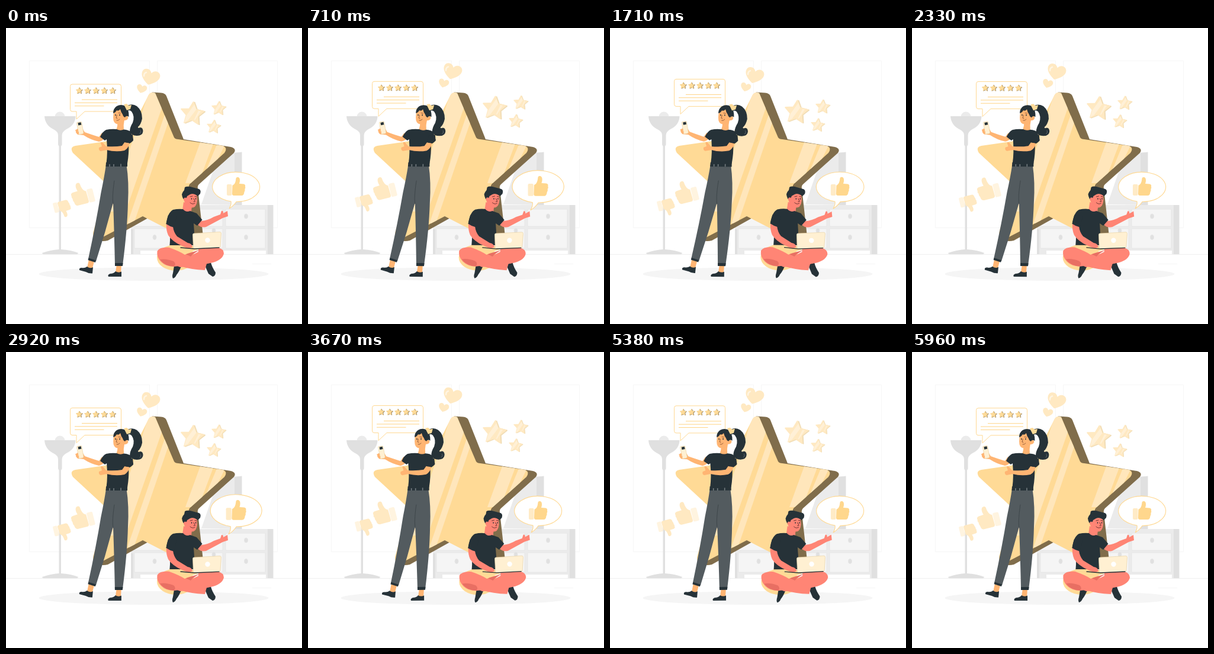
Animation, 500 px wide and 500 px high, one loop 6000 ms. Source, as an HTML page:

```html
<!DOCTYPE html>
<html lang="en">
<head>
<meta charset="utf-8">
<title>Customer feedback</title>
<style>
  html, body { margin: 0; width: 100%; height: 100%; overflow: hidden; background: #fff; }
  svg { display: block; width: 100vw; height: 100vh; }
  .skin { fill: #ffb573; }
  .pink { fill: #ff8575; }
  .dark { fill: #263238; }
  .line { fill: none; stroke-linecap: round; stroke-linejoin: round; }
</style>
</head>
<body>
<svg viewBox="0 0 500 500">
  <defs>
    <path id="star" stroke-linejoin="round" d="M0-10 2.9-4 9.5-3.1 4.8 1.5 5.9 8.1 0 5-5.9 8.1-4.8 1.5-9.5-3.1-2.9-4Z"/>
    <path id="heart" d="M0 11C-7 7-14 1-13-6C-12-13-3-14 0-7C3-14 12-13 13-6C14 1 7 7 0 11Z"/>
    <g id="thumb">
      <rect y="12" width="8.5" height="19" rx="2" opacity=".5"/>
      <path d="M9.500 14C14 12 15 7 15.500 2Q16-.5 19 0C23 1 22.500 7 21 11L28 11.500Q32 12 31 16Q32 18 30.500 20Q31 23 29.500 25Q29 31 25 31L12 31Q9 31 9 28Z"/>
    </g>
    <g id="gold">
      <use href="#star" x="1" y=".2" fill="#f0dcb5" stroke="#f0dcb5"/>
      <use href="#star" fill="#ffe9c2" stroke="#ffe9c2"/>
      <path d="M1-8 3-4-3 6-6 8-4.800 2ZM5-3.300 7-3 3 5 2 5Z" fill="#fff0d6"/>
    </g>
    <g id="rate">
      <use href="#star" x="1.500" y=".5" fill="#806d4b" stroke="#806d4b"/>
      <use href="#star" fill="#ffdb98" stroke="#ffdb98"/>
    </g>
    <path id="front" d="M241 113Q245 107 252 110L284 185Q286 188 291 188L366 199Q375 202 369 211L311 263Q308 266 309 270L317 350Q316 363 305 356L231 318 160 355Q146 361 147 346L169 268Q170 264 167 261L113 211Q107 201 117 199L200 187Q204 186 206 182Z"/>
    <clipPath id="clip"><use href="#front"/></clipPath>
  </defs>

  <!-- room -->
  <g fill="none" stroke="#f6f6f6">
    <path d="M39.500 55.500H242.500V337.500H39.500ZM255.500 55.500H458.500V337.500H255.500ZM416 398.500H448"/>
    <path d="M0 382.500H500" stroke="#efefef"/>
  </g>
  <g fill="#e0e0e0">
    <circle cx="91" cy="150" r="8.500" fill="#ebebeb"/>
    <path d="M65 149H117.500Q117 164 102 171Q95 175 94.500 181V197L93 200V374Q110 375 122 380Q122 382 118 382H65Q61 382 61 380Q75 375 89.500 374V200L88 197V181Q88 175 80 171Q66 164 65 149Z"/>
  </g>
  <path d="M330 298 360 212 398 210V299Z" fill="#ebebeb"/>
  <path d="M386 211 398.500 209.500V299H386Z" fill="#e0e0e0"/>
  <path d="M211 299H451V382H439V376H227V382H211Z" fill="#ebebeb"/>
  <path d="M442 299H451.500V382H442ZM211 340H215V382H211Z" fill="#e0e0e0"/>
  <g fill="#f5f5f5" stroke="#e6e6e6">
    <path d="M217 306H290V335H217ZM217 339H290V372H217ZM295 306H366V335H295ZM295 339H366V372H295ZM371 306H438V335H371ZM371 339H438V372H371Z"/>
    <g fill="#e0e0e0"><ellipse cx="405.500" cy="318" rx="3" ry="4"/><ellipse cx="405.500" cy="353.500" rx="3" ry="4"/><ellipse cx="251" cy="353.500" rx="3" ry="4"/><ellipse cx="351" cy="342" rx="3" ry="4"/></g>
  </g>
  <ellipse cx="249.500" cy="415.500" rx="194" ry="11.500" fill="#f5f5f5"/>

  <!-- large star -->
  <path fill="#806d4b" d="M247 108.500 262 109.500Q269 110 271 115L300 188 380 201Q390 204 385 211L326 264Q323 267 324 271L333 352Q332 365 318 360L300 270ZM150 356Q160 362 172 359L240 321 231 312Z"/>
  <use href="#front" fill="#ffda96"/>
  <g clip-path="url(#clip)" fill="#ffe6bb">
    <path d="M244 100 272 110 202 310 174 310ZM272 135 280 142 216 330 205 330Z"/>
    <path d="M331 185 354 185 325 262 303 262ZM361 185 371 195 338 262 329 262Z"/>
  </g>

  <!-- floating shapes -->
  <g id="float">
    <use href="#gold" transform="translate(314.500 145) rotate(6) scale(2)"/>
    <use href="#gold" transform="translate(359 136) rotate(4) scale(1.200)"/>
    <use href="#gold" transform="translate(350.500 167) rotate(6) scale(1.150)"/>
    <g fill="#ffe9c2">
      <use href="#heart" transform="translate(243.500 84) rotate(16) scale(1.200 1.120)"/>
      <use href="#heart" transform="translate(229 103.300) rotate(16) scale(.66 .62)"/>
      <use href="#thumb" transform="translate(120 262) rotate(-14) scale(-1.200 1.200) translate(-19)"/>
      <use href="#thumb" transform="translate(102 319) rotate(-14) scale(.9 -.9) translate(-19)"/>
    </g>
    <path class="line" d="M233 81Q233 76 237 75" stroke="#fff5e3" stroke-width="2.500"/>
  </g>

  <!-- review bubble -->
  <g id="review">
    <path d="M112 95H191Q194.500 95 194.500 98.500V137.500Q194.500 141 191 141H133L119 154V141H112Q108.500 141 108.500 137.500V98.500Q108.500 95 112 95Z" fill="#fff" stroke="#ffd993"/>
    <path d="M128 121H188M116 126.300H188M116 131.700H165.500" stroke="#ffd485"/>
    <g id="rates"></g>
  </g>

  <!-- standing woman -->
  <g id="woman">
    <path class="skin" d="M140 391 149 394 146 406 137 405ZM187 399 195 399 194 414 185 413Z"/>
    <path class="dark" d="M137 403Q142 407 147 404L146 414.500Q140 415 135 412L124 409Q123 405 128 405Q133 406 137 403ZM185 411Q190 414 195 411.500V420H173Q171 417 176 415Q182 415 185 411Z"/>
    <path fill="#535b5f" d="M169 231H203.500Q208 260 206 295Q205 340 197 401L184 400Q183 350 181 295Q168 345 152 394L139 390Q152 330 160.500 278Q166 252 169 231Z"/>
    <path class="line" d="M183 258Q179 285 181 297" stroke="#3f474b"/>
    <path class="dark" d="M139.500 388.500 152 392.500 151 396 138.500 392ZM184 397H197.500L197 402H184ZM169 227H205V234H168.500Z"/>
    <path d="M175 230V234M182 230V234M194 229.500V234" stroke="#737b7f" stroke-width="1.600"/>
    <path class="dark" d="M202 133Q212 126 221 132Q230 139 230 153Q228 163 223 167Q222 170 227 168Q231 168 231.500 174Q231 182 221 182Q212 182 209 175Q209 168 214 160Q218 149 212 141Q208 137 203 141Z"/>
    <path d="M227 173Q229 176 226 178" class="line" stroke="#59636a"/>
    <path class="skin" d="M188 155H200Q198 164 199 172Q193 176 186 172Q189 165 188 160Z"/>
    <path class="skin" d="M184 137Q180 146 181.500 156Q184 164 192 162Q198 160 200 156Q206 156 206.500 151Q205 147 200 149L198 137Z"/>
    <path class="dark" d="M181 144Q181 136 187 132Q194 128 202 132Q208 138 207.500 150Q203 147 201 151Q198 150 197 146Q194 142 193 137Q190 141 187 139Q185 143 181 144Z"/>
    <path fill="#ffdb98" d="M199 129 204 128 207 131 212 130 210 137 204 139Z"/>
    <g class="dark"><ellipse cx="185" cy="147" rx=".8" ry="1.300"/><ellipse cx="192" cy="147" rx=".8" ry="1.300"/></g>
    <path class="line" d="M187.500 147 186 152 188 152.500M187 156Q190 157 192 154M190 143.500 193.500 144" stroke="#7d4a2e" stroke-width=".8"/>
    <path class="skin" d="M162 177 157 184Q144 180 133 176L130 171 121 170Q118 171 118 176L121 180 131 181Q143 189 157 192Q163 191 169 184Z"/>
    <g transform="translate(-1.500 -.3) rotate(-3 126 170)">
      <path fill="#fff0d2" stroke="#ecd5a8" stroke-width=".7" d="M121.500 161Q121.300 159.500 123 159.300L128 158.700Q129.500 158.700 129.800 160L132 177Q132 179 130.500 179.300L125.500 180Q124 180 123.700 178.500Z"/>
      <path class="dark" d="M123.500 160.500 128.500 159.700 129.200 164 124 164.800Z"/>
    </g>
    <path class="skin" d="M117 172 122 171.500V174L118 175ZM118 176 123 175V178L120 179Z"/>
    <path class="dark" d="M169 172Q178 170 187 171Q193 174 199 171.500Q208 172 211 176L215 189Q212 194 207 196Q208 211 205 228.500H169.500Q172 211 170 188L167 190 159 184Q163 175 169 172Z"/>
    <path class="skin" d="M201 192 209 195Q206 204 200 207Q185 210 170 206L160 208Q156 207 157 202L162 200 160 194Q161 192 164 194L169 200Q185 201 196 199Z"/>
    <path class="dark" d="M203 181 214 180 215 190Q210 196 200 193Z"/>
  </g>

  <!-- seated man -->
  <g id="man">
    <ellipse cx="287" cy="388" rx="32" ry="22" fill="#ffda96"/>
    <path class="dark" d="M284 402 297 400Q293 411 288 417Q286 422 282 423Q280 420 282 414ZM335 399 346 396Q348 404 354 413Q354 419 349 420L342 415Z"/>
    <path class="pink" d="M325 371Q343 370 358 371Q368 373 368 381Q366 391 350 396Q334 400 317 402L294 404 285 400Q303 389 325 378Z"/>
    <path class="pink" d="M279 371Q260 369 255.500 377Q254 387 262 395Q270 403 284 403L293 402Q312 408 336 409L339 398Q320 390 304 382Z"/>
    <path fill="#e86f63" d="M260 391Q270 389 283 394Q288 398 284 403Q268 402 260 391ZM303 382 327 375Q316 381 312 386Z"/>
    <path fill="#ffda96" d="M276 366 317 368 325 374Q313 377 302 383Q293 377 276 371Z"/>
    <path class="pink" d="M300 294 314 300 313 310Q304 316 298 308Z"/>
    <path class="pink" d="M300 281Q300 291 303 297Q309 305 317 303Q322 301 323 291L322 280Z"/>
    <path class="pink" d="M324 323 330 326Q341 325 351 319L362 315 364 309Q367 308 367 313L374 309 375 318 366 321Q353 328 338 336Q329 338 324 332Z"/>
    <path class="dark" d="M282 307Q291 305 299 306Q304 312 311 309L322 313 331.500 324 323 334 317 330Q319 349 318 367H276.500Q278 350 276 336L270.500 331Q273 312 282 307Z"/>
    <path class="pink" d="M271 330 282 335Q283 345 289 352L307 363Q314 364 315 370L309 373 297 368Q280 360 274 350Q270 341 271 330Z"/>
    <path class="dark" d="M274 316 288 318 284 337Q276 335 270.500 331Z"/>
    <path class="dark" d="M301 274 302 269Q305 267 311 268L326 272Q330 274 328 280L324 284Q316 278 311 281L306 284 303 292Q298 289 297 281Q298 277 301 274Z"/>
    <path class="pink" d="M305 287Q300 285 300 290Q302 295 306 294Z"/>
    <g class="dark"><ellipse cx="313.500" cy="288.500" rx=".8" ry="1.300"/><ellipse cx="320.500" cy="288.500" rx=".8" ry="1.300"/></g>
    <path class="line" d="M317 288 319.500 293 317 293.500M311 295Q315 299 319 296M311 285 315 284M319 284.500 322 285" stroke="#612d2d" stroke-width=".9"/>
    <path fill="#fff0d2" stroke="#ead5aa" stroke-width=".7" d="M317.500 347 361 344.500Q363.500 344.500 363.500 347L362 369Q362 371 360 371L319 373Q316.500 373 316.500 371L315.500 349Q315.500 347 317.500 347Z"/>
    <circle cx="340.500" cy="358.500" r="4.200" fill="#fff"/>
    <path class="line" d="M295 371 318 373 360 371" stroke="#263238" stroke-width="1.300"/>
  </g>

  <!-- approval bubble -->
  <g id="like">
    <path d="M373 291.500A40 25 0 1 1 389 293.500Q385 300 377 305Q381 298 380 293Z" fill="#fff" stroke="#ffd993" stroke-width="1.100"/>
    <use href="#thumb" x="373" y="252" fill="#ffd78d"/>
  </g>
</svg>
<script>
  const get = id => document.getElementById(id);
  const place = (id, value) => get(id).setAttribute("transform", value);

  get("rates").innerHTML = [123.4, 137.5, 151.5, 165.6, 179.7]
    .map(x => `<use href="#rate" transform="translate(${x} 106) scale(.56)"/>`).join("");

  // Linear keyframes: [time, value]
  const period = 6000;
  const swaying = [[0, 0], [1500, 1], [4500, -1], [period, 0]];
  const beating = [[0, 1], [600, 1.1], [1800, 1], [2400, 1], [3000, 1.1], [3600, 1], [period, 1]];
  function tween(keys, t) {
    const i = keys.findIndex(key => key[0] > t);
    const [t0, a] = keys[i - 1], [t1, b] = keys[i];
    return a + (b - a) * (t - t0) / (t1 - t0);
  }

  // Steady rise and return, once per span
  const rise = (t, span) => tween([[0, 0], [span / 2, -10], [span, 0]], t % span);

  const start = performance.now();
  function draw() {
    const t = (performance.now() - start) % period;
    const sway = tween(swaying, t);
    place("float", `translate(0 ${rise(t, 1500)})`);
    place("review", `translate(0 ${rise(t, 3000)})`);
    place("woman", `rotate(${sway} 177 274)`);
    place("man", `rotate(${sway} 315 345)`);
    place("like", `translate(389 274) scale(${tween(beating, t)}) translate(-389 -274)`);
    requestAnimationFrame(draw);
  }
  draw();
</script>
</body>
</html>
```
